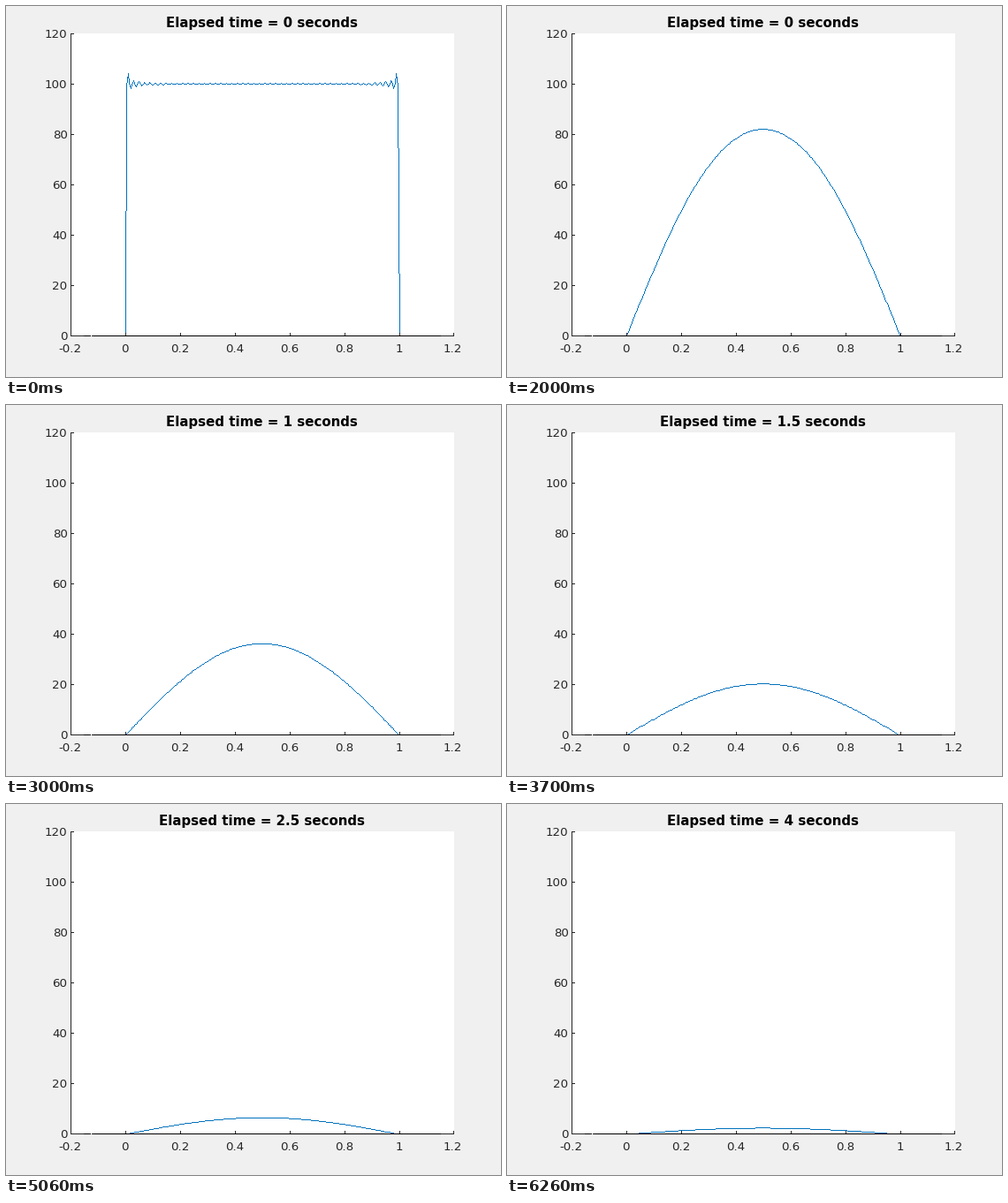
A matplotlib script for the animation above (7760 ms loop, 560 by 420 pixels).

```python
import numpy as np
import matplotlib.pyplot as plt
from matplotlib.animation import FuncAnimation

W, H, DPI = 560, 420, 100
INTERVAL, FRAMES = 20, 388
STEPS, T_END, HOLD = 239, 4.0, 74
DIFFUSIVITY = 0.1

# Plot area; RIGHT and BOTTOM are exclusive pixel edges
LEFT, RIGHT, TOP, BOTTOM = 73, 507, 31, 374
TICK = 4
GREY, WHITE, INK, BLACK = (240,) * 3, (255,) * 3, (38,) * 3, (0,) * 3
BLUE = (0, 114, 189)

plt.rcParams["font.family"] = "DejaVu Sans"


def to_col(x):
    col = np.floor(LEFT + (x + 0.2) * (RIGHT - LEFT) / 1.4 + 1e-6)
    return np.minimum(col, RIGHT - 1).astype(int)


def to_row(u):
    row = np.floor(BOTTOM - u * (BOTTOM - TOP) / 120 + 1e-6)
    return np.minimum(row, BOTTOM - 1).astype(int)


x_ticks = np.arange(8) * 0.2 - 0.2
y_ticks = np.arange(7) * 20
tick_cols, tick_rows = to_col(x_ticks), to_row(y_ticks)

# Heated rod with cold ends: sine series of a constant initial temperature
x = np.linspace(0, 1, 201)
n = np.arange(1, 500, 2)
modes = np.sin(np.pi * np.outer(x, n)) * 400 / (np.pi * n)
decay = DIFFUSIVITY * (np.pi * n) ** 2
cols = to_col(x)


def temperature(t):
    return modes @ np.exp(-decay * t)


def span(a, b, count):
    """Whole steps from a to b, with halves rounded towards b."""
    return np.rint(np.linspace(a, b, count) + 1e-4 * np.sign(b - a)).astype(int)


def draw_curve(pixels, u):
    """Join the samples with one-pixel lines without antialiasing."""
    rows = to_row(u)
    for c0, c1, r0, r1 in zip(cols[:-1], cols[1:], rows[:-1], rows[1:]):
        count = max(abs(c1 - c0), abs(r1 - r0)) + 1
        pixels[span(r0, r1, count), span(c0, c1, count)] = BLUE


def draw_axes(pixels):
    pixels[TOP:BOTTOM, LEFT] = INK
    pixels[BOTTOM - 1, LEFT:RIGHT] = INK
    pixels[BOTTOM - 1, to_col(-0.15):to_col(1.15) + 1] = BLACK
    pixels[BOTTOM - 1, to_col(-0.125)] = WHITE
    for c in tick_cols:
        pixels[BOTTOM - TICK:BOTTOM - 1, c] = INK
    for r in tick_rows:
        pixels[r, LEFT:LEFT + TICK] = INK


background = np.full((H, W, 3), GREY, dtype=np.uint8)
background[TOP:BOTTOM, LEFT:RIGHT] = WHITE


def render(u):
    pixels = background.copy()
    draw_curve(pixels, u)
    draw_axes(pixels)
    return pixels


fig = plt.figure(figsize=(W / DPI, H / DPI), dpi=DPI, facecolor="#f0f0f0")
ax = fig.add_axes([0, 0, 1, 1])
ax.axis("off")
picture = ax.imshow(render(temperature(0)), extent=(0, W, H, 0),
                    interpolation="nearest", aspect="auto")
ax.set(xlim=(0, W), ylim=(H, 0))


def label(px, py, text, size=13.33, ha="center", **style):
    return ax.text(px, py, text, fontsize=size * 72 / DPI, ha=ha,
                   va="baseline", **style)


for value, col in zip(x_ticks, tick_cols):
    label(col - 0.5, 392, f"{round(value, 1) + 0:g}", color="#262626")
for value, row in zip(y_ticks, tick_rows):
    label(69.5, row + 5, f"{value}", ha="right", color="#262626")
title = label(289.5, 24, "", size=15, weight="bold", color="black")


def update(frame):
    step = min(max(frame - HOLD, 0), STEPS)
    picture.set_data(render(temperature(T_END * step / STEPS)))
    # The clock advances in half seconds
    shown = (step * 8 // STEPS) / 2
    title.set_text(f"Elapsed time = {shown:g} seconds")
    return picture, title


anim = FuncAnimation(fig, update, frames=FRAMES, interval=INTERVAL,
                     repeat=True, repeat_delay=0, cache_frame_data=False)
plt.show()
```
